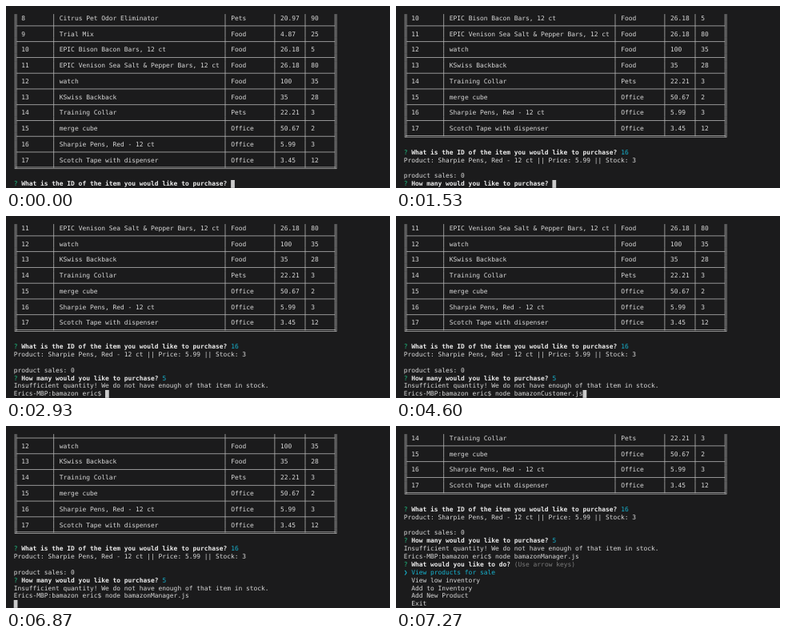
These frames come from a looping animation (480x228 px, 8000 ms). An HTML page with a canvas:

```html
<!DOCTYPE html>
<html lang="en">
<head>
<meta charset="utf-8">
<title>Terminal store</title>
<style>
html, body { margin: 0; width: 480px; height: 228px; overflow: hidden; background: #1b1b1c; }
canvas { display: block; }
</style>
</head>
<body>
<canvas id="stage" width="480" height="228"></canvas>
<script>
const ctx = document.getElementById('stage').getContext('2d');
const LOOP = 8000;
const BG = '#1b1b1c', TEXT = '#d9d9d9', BOLD = '#ececec', RULE = '#b4b4b4';
const GREEN = '#1fc283', CYAN = '#16b3cf', DIM = '#7b7b7b', CURSOR = '#cbcbcb';
const SIZE = 7.91, X0 = 9.7, CELL = 4.762, ROW = 9.88, LAST = 222.5, VISIBLE = 22;
const FONT = SIZE + 'px "DejaVu Sans Mono", "Liberation Mono", monospace';

// Table: borders and text columns, in character cells
const LEFT = 0, RIGHT = 84;
const INNER = [10, 55, 68, 76];
const COLS = [2, 12, 57, 70, 78];
const ITEMS = [
  ['8', 'Citrus Pet Odor Eliminator', 'Pets', '20.97', '90'],
  ['9', 'Trial Mix', 'Food', '4.87', '25'],
  ['10', 'EPIC Bison Bacon Bars, 12 ct', 'Food', '26.18', '5'],
  ['11', 'EPIC Venison Sea Salt & Pepper Bars, 12 ct', 'Food', '26.18', '80'],
  ['12', 'watch', 'Food', '100', '35'],
  ['13', 'KSwiss Backback', 'Food', '35', '28'],
  ['14', 'Training Collar', 'Pets', '22.21', '3'],
  ['15', 'merge cube', 'Office', '50.67', '2'],
  ['16', 'Sharpie Pens, Red - 12 ct', 'Office', '5.99', '3'],
  ['17', 'Scotch Tape with dispenser', 'Office', '3.45', '12']
];

const seg = (text, color = TEXT, bold = false) => ({ text, color, bold });
const line = (...parts) => ({ parts });
const ask = (question, ...rest) => line(seg('? ', GREEN), seg(question + ' ', BOLD, true), ...rest);

const TABLE = ITEMS.flatMap((item, i) => i ? [{ rule: 'mid' }, { item }] : [{ item }]);
TABLE.push({ rule: 'end' });

const Q_ID = 'What is the ID of the item you would like to purchase?';
const Q_COUNT = 'How many would you like to purchase?';
const SHELL = 'Erics-MBP:bamazon eric$ ';

function screen(t) {
  const rows = [...TABLE, line()];
  const typedId = t < 270 ? '' : t < 600 ? '1' : '16';
  rows.push(ask(Q_ID, seg(typedId, t < 1530 ? TEXT : CYAN)));
  if (t < 1530) return rows;

  rows.push(
    line(seg('Product: Sharpie Pens, Red - 12 ct || Price: 5.99 || Stock: 3')),
    line(),
    line(seg('product sales: 0')),
    ask(Q_COUNT, seg(t < 2670 ? '' : '5', t < 2930 ? TEXT : CYAN)));
  if (t < 2930) return rows;

  const command = t < 4600 ? '' : t < 5930 ? 'node bamazonCustomer.js' : 'node bamazonManager.js';
  rows.push(
    line(seg('Insufficient quantity! We do not have enough of that item in stock.')),
    line(seg(SHELL + command)));
  if (t < 6870) return rows;
  if (t < 7070) return [...rows, line()];

  rows.push(
    ask('What would you like to do?', seg('(Use arrow keys)', DIM)),
    line(seg('❯ View products for sale', CYAN)));
  for (const choice of ['View low inventory', 'Add to Inventory', 'Add New Product', 'Exit'])
    rows.push(line(seg('  ' + choice)));
  return rows;
}

const cellX = col => X0 + col * CELL;
const midX = col => cellX(col + 0.5);

function write(text, col, y, color = TEXT, bold = false) {
  ctx.font = (bold ? 'bold ' : '') + FONT;
  ctx.fillStyle = color;
  ctx.fillText(text, cellX(col), y + 2.8);
}

function bar(x, y, w, h) {
  ctx.fillStyle = RULE;
  ctx.fillRect(x, y, w, h);
}

function drawBorders(y, rule) {
  const top = y - ROW / 2, half = rule === 'end' ? ROW / 2 : ROW;
  const l = midX(LEFT), r = midX(RIGHT);
  for (const d of [-1.3, 0.6]) {
    bar(l + d, top, 0.75, half + (rule === 'end' ? 1 : 0));
    bar(r + d, top, 0.75, half + (rule === 'end' ? 1 : 0));
  }
  for (const col of INNER) bar(midX(col) - 0.4, top, 0.8, half);
  if (rule === 'mid') bar(l + 1, y - 0.4, r - l - 2, 0.8);
  if (rule === 'end') {
    bar(l, y - 1.2, r - l, 0.75);
    bar(l - 1.3, y + 0.6, r - l + 2.6, 0.75);
  }
}

function drawRow(row, y) {
  if (row.item || row.rule) drawBorders(y, row.rule);
  if (row.item) row.item.forEach((text, i) => write(text, COLS[i], y));
  let col = 0;
  for (const { text, color, bold } of row.parts || []) {
    write(text, col, y, color, bold);
    col += text.length;
  }
  return col;
}

function draw(t) {
  ctx.fillStyle = BG;
  ctx.fillRect(0, 0, 480, 228);
  const rows = screen(t).slice(-VISIBLE);
  let end = 0;
  rows.forEach((row, i) => {
    end = drawRow(row, LAST - (rows.length - 1 - i) * ROW);
  });
  // The menu hides the cursor
  if (t < 7070) {
    ctx.fillStyle = CURSOR;
    ctx.fillRect(cellX(end), LAST - 4.5, CELL, ROW);
  }
}

ctx.textRendering = 'geometricPrecision';
const start = performance.now();
function tick() {
  draw((performance.now() - start) % LOOP);
  requestAnimationFrame(tick);
}
tick();
</script>
</body>
</html>
```
